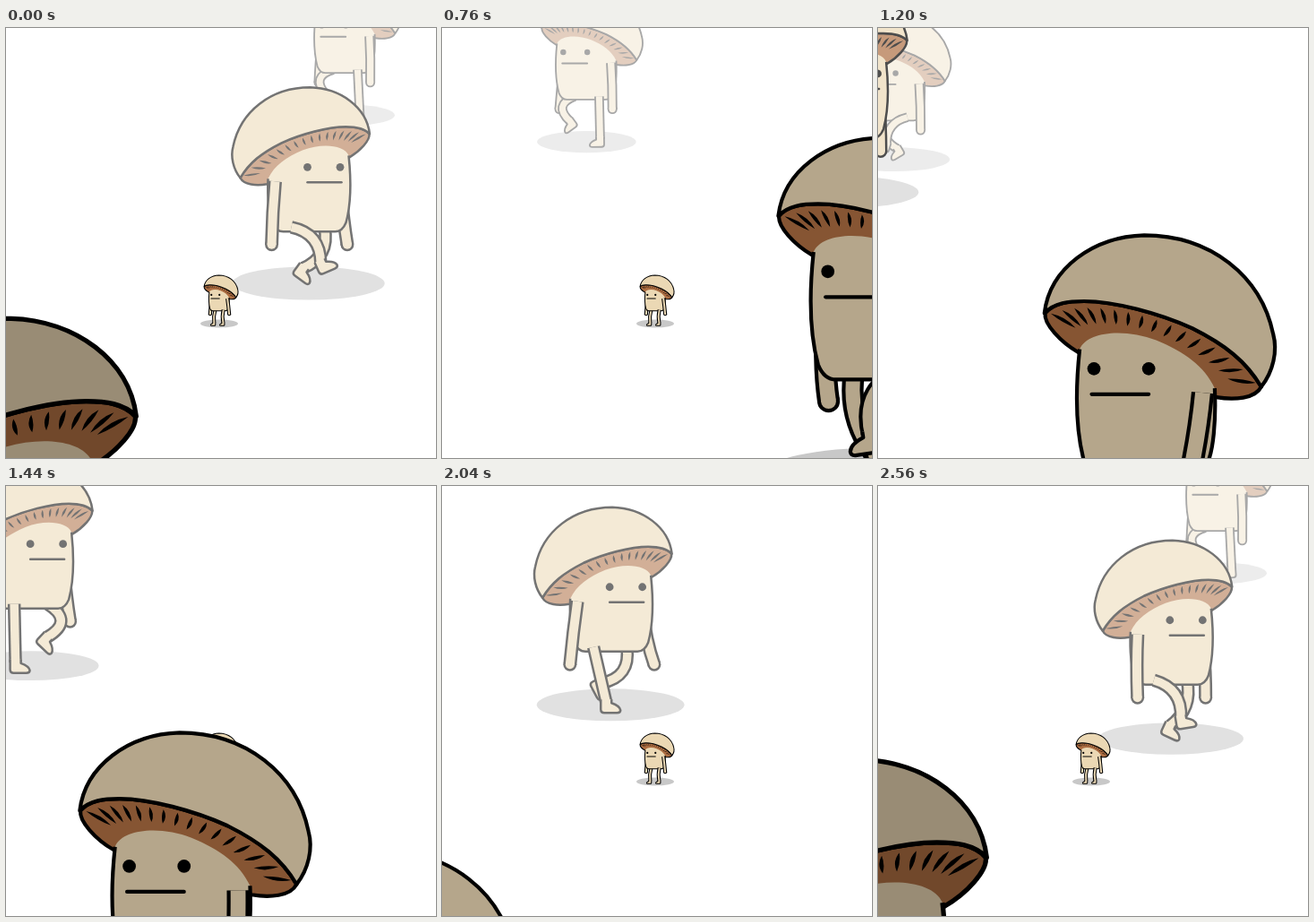
Recreate the animation shown at these times as an HTML page. Size 480 by 480 pixels, loop 2600 ms.

```html
<!DOCTYPE html>
<html lang="en">
<head>
<meta charset="utf-8">
<title>Walking mushrooms</title>
<style>
html, body { margin: 0; width: 100%; height: 100%; overflow: hidden; background: #fff; }
svg { display: block; width: 100vw; height: 100vh; }
</style>
</head>
<body>
<svg id="stage" viewBox="0 0 480 480" fill="none" stroke-linejoin="round"></svg>
<script>
const LOOP = 2600, STEP = 40, CYCLE = 680;
const stage = document.getElementById('stage');
const TAU = Math.PI * 2;
const fix = v => Math.round(v * 100) / 100;
const lerp = (a, b, k) => a + (b - a) * k;
const frac = v => v - Math.floor(v);

// Shapes face right; the origin is the centre of the ground shadow.
const DOME = 'M-76-118C-84-128-87-142-84-153C-76-192-42-219 2-219C36-218 65-197 68.5-167' +
  'C62-174 52-175 42-175C22-175-8-167-30-157C-52-146-66-135-76-118Z';
const UNDER = 'M68-167C69-160 58-148 46-141L-46-111C-58-109-72-110-76-118' +
  'C-66-135-52-146-30-157C-8-167 22-175 42-175C52-175 62-174 68-167Z';
const SIDES = 'C-46-95-44-75-40-67Q-36-58-28-58L30-58Q38-58 42-68C48-90 48-115 45-143';
const STEM = 'M45-143C40-155 15-157-6-149C-25-141-38-132-45-117' + SIDES + 'Z';
const EDGE = 'M-45-117' + SIDES;
const FOOT = 'M-6-3L-6 8Q-6 12-2 12L12 12Q16 12 16 9Q15 4 6 1L6-3';

const GILLS = (() => {
  const cubic = (a, b, c, d, u) => {
    const v = 1 - u;
    return a * v * v * v + 3 * b * v * v * u + 3 * c * v * u * u + d * u * u * u;
  };
  let path = '';
  for (let i = 0; i < 16; i++) {
    const u = i / 15;
    const x = cubic(56, 30, -28, -63, u), y = cubic(-162, -172, -160, -122, u);
    const a = (150 - 158 * u) * Math.PI / 180;
    const half = (9 + 40 * (u - .5) ** 2) / 2;
    const cx = Math.cos(a), sy = Math.sin(a);
    const at = (l, n) => fix(x + cx * l - sy * n) + ' ' + fix(y + sy * l + cx * n);
    path += `M${at(-half, 0)}Q${at(0, 3.2)} ${at(half, 0)}Q${at(0, -1.6)} ${at(-half, 0)}Z`;
  }
  return path;
})();

// Near ankle through one walk cycle: phase, x, y, foot angle.
const GAIT = [
  [0, -48, -19, 65], [.1, -28, -30, 55], [.2, 0, -29, 30], [.29, 11, -23, -8], [.35, 14, -23, -24],
  [.45, 7, -11, -10], [.53, -5, -3, 0], [.67, -20, -4, 0], [.82, -36, -14, 30], [1, -48, -19, 65]
];

function ankle(phase) {
  const p = frac(phase);
  let i = 1;
  while (GAIT[i][0] < p) i++;
  const a = GAIT[i - 1], b = GAIT[i], k = (p - a[0]) / (b[0] - a[0]);
  return { x: lerp(a[1], b[1], k), y: lerp(a[2], b[2], k), r: lerp(a[3], b[3], k) };
}

function walkPose(phase) {
  const far = ankle(phase + .5);
  far.x += 32;
  far.y -= 2;
  const swing = Math.cos(TAU * phase);
  return {
    lift: 2.3 + 3.9 * Math.cos(2 * TAU * (phase - .17)),
    near: ankle(phase),
    far,
    nearHand: -34 + 11.5 * swing,
    farHand: 35 - 14 * swing
  };
}

const STILL = {
  lift: 0, near: { x: -18, y: -3, r: 0 }, far: { x: 23, y: -3, r: 0 }, nearHand: -45, farHand: 41
};

// fog blends towards white, shade towards black
function palette(fog, shade) {
  const mix = rgb => 'rgb(' + rgb.map(c => Math.round(255 - (255 - c * shade) * fog)).join() + ')';
  return {
    ink: mix([0, 0, 0]), skin: mix([235, 216, 180]), brown: mix([174, 110, 66]),
    ground: mix([200, 200, 200].map(c => c / shade))
  };
}

function tube(d, w, c, lw) {
  return `<path d="${d}" stroke="${c.ink}" stroke-width="${w + lw}"/>` +
    `<path d="${d}" stroke="${c.skin}" stroke-width="${w - lw}"/>`;
}

function arm(x, y, bendX, hand, lift, c, lw) {
  const hy = -43.5 - lift, w = 12.5;
  const d = `M${x} ${fix(y - lift)}Q${fix(bendX)} ${fix(y + 34 - lift)} ${fix(hand)} ${fix(hy)}`;
  const dot = (r, col) => `<circle cx="${fix(hand)}" cy="${fix(hy)}" r="${r}" fill="${col}"/>`;
  return dot((w + lw) / 2, c.ink) + tube(d, w, c, lw) + dot((w - lw) / 2, c.skin);
}

function leg(hipX, foot, lift, c, lw) {
  const hy = -63 - lift, dx = foot.x - hipX, dy = foot.y - hy;
  const len = Math.hypot(dx, dy);
  const bend = 1.3 * Math.sqrt(Math.max(0, 61 * 61 - len * len)) / 2;
  const kx = hipX + dx / 2 + dy / len * bend, ky = hy + dy / 2 - dx / len * bend;
  const d = `M${hipX} ${fix(hy)}Q${fix(kx)} ${fix(ky)} ${fix(foot.x)} ${fix(foot.y)}`;
  return tube(d, 12, c, lw) +
    `<path transform="translate(${fix(foot.x)} ${fix(foot.y)}) rotate(${fix(foot.r)})" d="${FOOT}" ` +
    `fill="${c.skin}" stroke="${c.ink}" stroke-width="${lw}"/>`;
}

function mushroom(x, y, size, dir, pose, c, lw = 2.5) {
  const { lift, near, far, nearHand, farHand } = pose;
  const line = `stroke="${c.ink}" stroke-width="${lw}"`;
  const wide = 84.8 - 1.55 * lift;
  return `<g transform="translate(${fix(x)} ${fix(y)}) scale(${size * dir} ${size})">` +
    `<ellipse rx="${fix(wide)}" ry="${fix(wide * .218)}" fill="${c.ground}"/>` +
    arm(36, -105, 39, farHand, lift, c, lw) +
    leg(18, far, lift, c, lw) +
    `<g transform="translate(0 ${fix(-lift)})">` +
    `<path d="${UNDER}" fill="${c.brown}" ${line}/>` +
    `<path d="${GILLS}" fill="${c.ink}"/>` +
    `<path d="${STEM}" fill="${c.skin}"/>` +
    `<path d="${EDGE}" ${line}/>` +
    `<path d="${DOME}" fill="${c.skin}" ${line}/>` +
    `<circle cx="-1" cy="-130" r="4.4" fill="${c.ink}"/><circle cx="35.5" cy="-130" r="4.4" fill="${c.ink}"/>` +
    `<path d="M-1-113H37" ${line} stroke-linecap="round"/></g>` +
    leg(-19, near, lift, c, lw) +
    arm(-37, -114, lerp(-38, nearHand, .4) - 1, nearHand, lift, c, lw) +
    '</g>';
}

const FAR = palette(.34, 1), FULL = palette(1, 1), CLOSE = palette(1, .77), CLOSEST = palette(1, .65);

// Walks in from the right, rests over the seam, then walks on.
function farWalker(t) {
  const d = t < 1700 ? Math.max(0, t - 90) : Math.min(0, t - 2560);
  return mushroom(378.5 - .324 * d, 97.3 + .0445 * d, .735, -1, walkPose(.69 + d / CYCLE), FAR);
}

function midWalker(t) {
  const d = t < 950 ? t : t - LOOP;
  const fog = t < 950 ? .55 : lerp(.7, .55, Math.min(1, Math.max(0, (t - 1200) / 200)));
  const c = palette(fog, 1);
  c.ground = 'rgb(225,225,225)';
  return mushroom(337.5 + .2667 * d, 285 + .0727 * d, 1, 1, walkPose((d + 920) / CYCLE), c);
}

function closeWalker(t) {
  const d = t - 1200;
  return t < 400 ? '' :
    mushroom(300.5 - .431 * d, 595.7 + .2245 * d, 1.675, -1, walkPose(.897 + d / CYCLE), CLOSE);
}

function closestWalker(t) {
  const d = t < 1000 ? t : t - LOOP;
  return Math.abs(d) > 700 ? '' :
    mushroom(1.5 + .6 * d, 786 + .3215 * d, 2.1, 1, walkPose(.325 + d / CYCLE), CLOSEST);
}

function draw(ms) {
  const t = Math.floor((ms % LOOP) / STEP) * STEP;
  stage.innerHTML = farWalker(t) + midWalker(t) +
    mushroom(238, 330, .247, -1, STILL, FULL, 4.2) +
    closestWalker(t) + closeWalker(t);
}

const start = performance.now();
function tick() {
  draw(performance.now() - start);
  requestAnimationFrame(tick);
}
tick();
</script>
</body>
</html>
```
